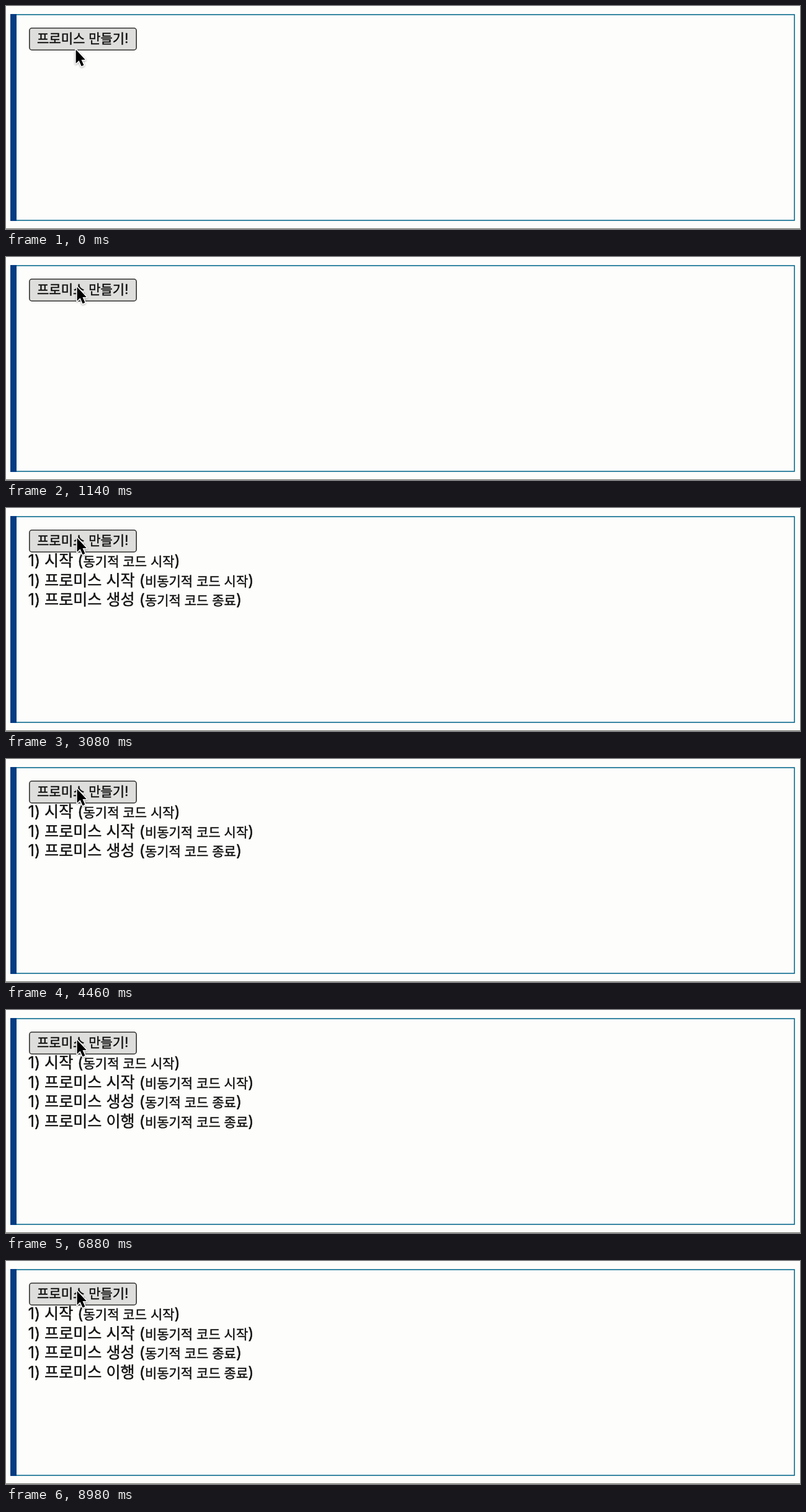
An HTML page for the animation above (9000 ms loop, 1280x361 px).

```html
<!DOCTYPE html>
<html lang="ko">
<head>
<meta charset="utf-8">
<title>프로미스 만들기</title>
<style>
  html, body { margin: 0; width: 100%; height: 100%; overflow: hidden; background: #fdfdfb; }
  svg { display: block; }
  text {
    font: 25.1px Inter, "Noto Sans CJK KR", sans-serif;
    fill: #111; stroke: #111; stroke-width: .45px; white-space: pre;
  }
  .small { font-size: 21px; }
  #cursor { filter: drop-shadow(0 1.5px 1.5px rgba(0, 0, 0, .35)); }
</style>
</head>
<body>
<svg width="1280" height="361" viewBox="0 0 1280 361">
  <rect x="8" y="14" width="1263" height="333" fill="none" stroke="#086a8f" stroke-width="1.6"/>
  <rect x="7" y="13" width="10" height="335" fill="#043c83"/>
  <rect y="360" width="1280" height="1" fill="#6d6d66"/>
  <rect id="button" x="37.8" y="35.8" width="172.4" height="35.4" rx="4" stroke="#333" stroke-width="1.6"/>
  <text class="small" x="50" y="59.5">프로미스 만들기!</text>
  <g id="log"></g>
  <path id="cursor" d="M0 0V22.5L5 17.8L9 27L12.8 25.3L8.9 16.4H15.2Z"
        stroke="#fff" stroke-width="3" stroke-linejoin="round" paint-order="stroke"/>
</svg>
<script>
const LOOP = 9000, MOVE_START = 60, MOVE_END = 900, PRESS = 1840, RELEASE = 1940, FULFILLED = 4740;
const messages = [
  ['시작', '동기적 코드 시작', RELEASE],
  ['프로미스 시작', '비동기적 코드 시작', RELEASE],
  ['프로미스 생성', '동기적 코드 종료', RELEASE],
  ['프로미스 이행', '비동기적 코드 종료', FULFILLED],
];
const byId = id => document.getElementById(id);
const button = byId('button'), cursor = byId('cursor'), log = byId('log');

log.innerHTML = messages.map(([title, note], i) =>
  `<text x="35.7" y="${94 + i * 31.7}">1) ${title} (<tspan class="small">${note}</tspan>)</text>`).join('');

function draw() {
  const t = performance.now() % LOOP;
  const p = Math.min(1, Math.max(0, (t - MOVE_START) / (MOVE_END - MOVE_START)));
  const ease = p * p * (3 - 2 * p);
  cursor.setAttribute('transform', `translate(${112.6 + 2 * ease} ${70.5 - 22 * ease})`);
  button.setAttribute('fill', t >= PRESS && t < RELEASE ? '#f0f0ee' : '#dededc');
  messages.forEach(([, , shownAt], i) => {
    log.children[i].style.display = t >= shownAt ? '' : 'none';
  });
  requestAnimationFrame(draw);
}
draw();
</script>
</body>
</html>
```
